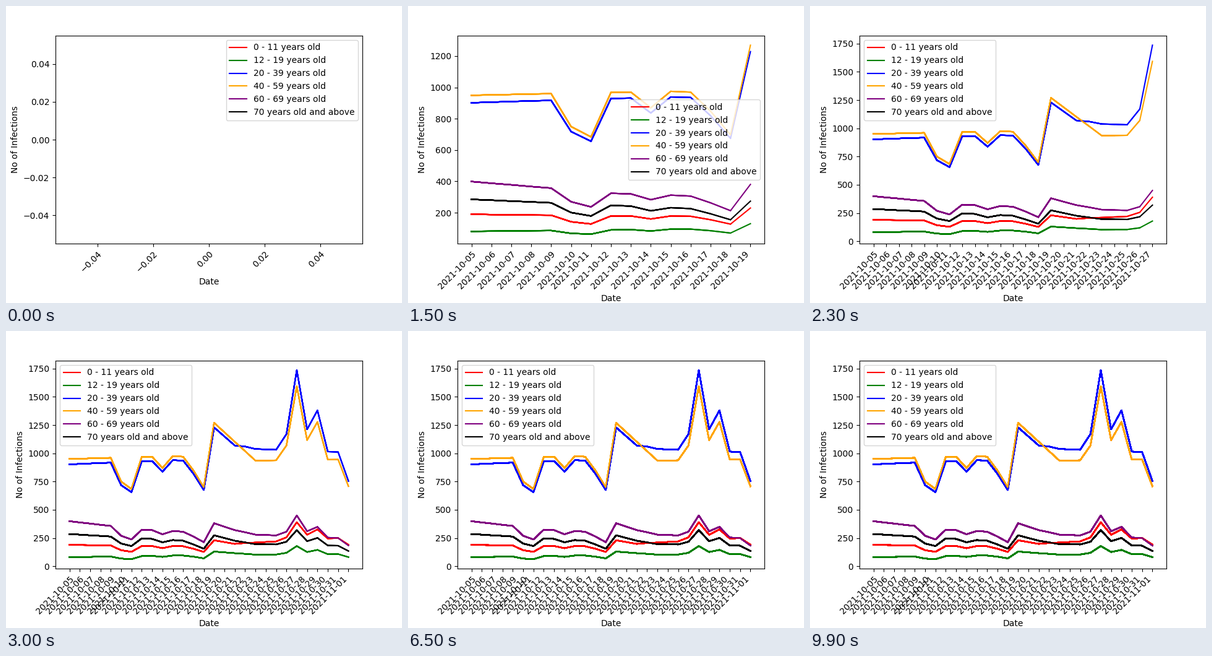
These frames come from a looping animation (640 px wide and 480 px high, 10000 ms). A matplotlib script:

```python
import matplotlib.pyplot as plt
import numpy as np
from matplotlib.animation import FuncAnimation
from matplotlib.collections import LineCollection

FRAMES = 100
INTERVAL = 100

# Share of the daily wave per age group, at a few key days.
SHARE_DAYS = [0, 7, 16, 18, 27]
GROUPS = {
    "0 - 11 years old": ("red", [0.20, 0.185, 0.18, 0.225, 0.27]),
    "12 - 19 years old": ("green", [0.085, 0.093, 0.105, 0.11, 0.115]),
    "20 - 39 years old": ("blue", [0.95, 0.96, 0.97, 1.11, 1.065]),
    "40 - 59 years old": ("orange", [1, 1, 1, 1, 1]),
    "60 - 69 years old": ("purple", [0.42, 0.335, 0.29, 0.30, 0.26]),
    "70 years old and above": ("black", [0.30, 0.255, 0.205, 0.21, 0.19]),
}
COLORS = [color for color, _ in GROUPS.values()]

DATES = [f"2021-10-{d:02d}" for d in range(5, 32)] + ["2021-11-01"]
DAYS, N = len(DATES), len(GROUPS)


def daily_wave(t):
    """Slow baseline, a mid-month surge that fades, and single-day jumps."""
    wave = np.interp(t, [0, 10, 18, 26], [950, 975, 935, 945])
    wave += np.interp(t, [13, 14, 18], [0, 315, 0])
    dips = {5: 212, 6: 281, 9: 103, 12: 117, 13: 262, 27: 237}
    peaks = {21: 130, 22: 653, 23: 176, 24: 335}
    wave[list(dips)] -= list(dips.values())
    wave[list(peaks)] += list(peaks.values())
    return wave


days = np.arange(DAYS)
wave = daily_wave(days)
cases = np.column_stack([np.round(wave * np.interp(days, SHARE_DAYS, share))
                         for _, share in GROUPS.values()])
full_curves = [np.column_stack([days, col]) for col in cases.T]

fig, ax = plt.subplots(figsize=(6.4, 4.8), dpi=100)
fig.subplots_adjust(bottom=0.2, top=0.9)
overlay = None


def reset():
    global overlay
    ax.clear()
    ax.set_prop_cycle(color=COLORS)
    plt.xticks(rotation=45, ha="right", rotation_mode="anchor")
    ax.set_xlabel("Date")
    ax.set_ylabel("No of Infections")
    overlay = LineCollection([], colors=COLORS, linewidths=1.5, zorder=2.1,
                             capstyle="projecting", joinstyle="round")
    ax.add_collection(overlay, autolim=False)


def update(i):
    """Stack one layer of curves per step, each a day longer than the last."""
    day = min(i, DAYS)
    if len(ax.lines) > N * (day + 1):
        reset()
    for k in range(len(ax.lines) // N, day + 1):
        ax.plot(DATES[:k], cases[:k])

    # Once all days are shown, the full curves keep piling up.
    overlay.set_segments(full_curves * max(0, i - DAYS))
    ax.legend(ax.lines[:N], list(GROUPS),
              loc="best" if i < DAYS else "upper left")


reset()
anim = FuncAnimation(fig, update, frames=FRAMES, interval=INTERVAL,
                     init_func=lambda: update(0), repeat=True,
                     cache_frame_data=False)
plt.show()
```
